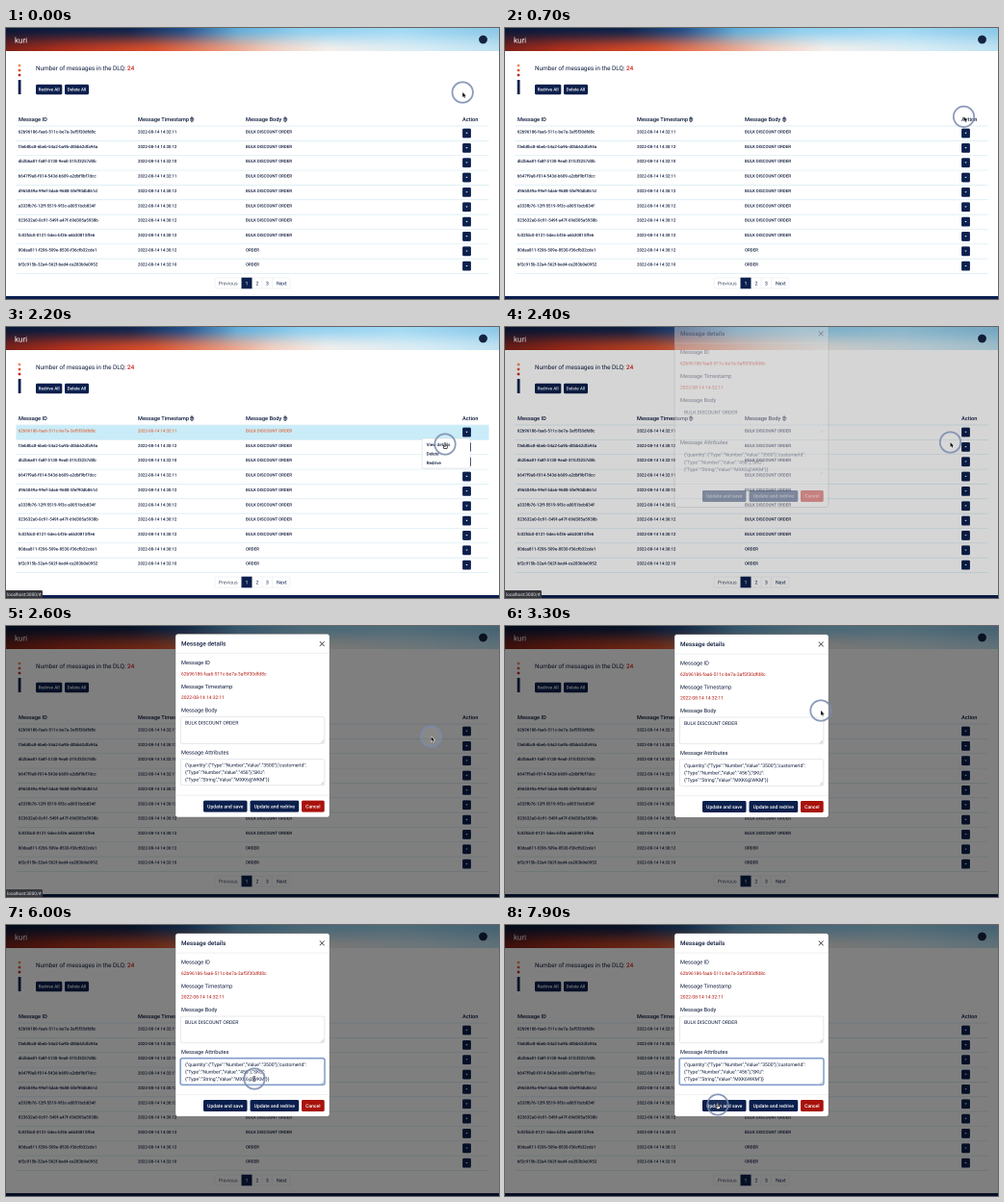
An HTML page with a canvas that plays this animation: 512 by 282 pixels, repeating every 8 s.

```html
<!DOCTYPE html>
<html lang="en">
<head>
<meta charset="utf-8">
<title>Message queue</title>
<style>
html, body { margin: 0; width: 100%; height: 100%; overflow: hidden; background: #fff; }
canvas { display: block; width: 512px; height: 282px; }
</style>
</head>
<body>
<canvas id="stage"></canvas>
<script>
const W = 512, H = 282, LOOP = 8000, STEP = 100;
const NAVY = '#0b1f4d', INK = '#0d1a3c', RED = '#b3160f', LINE = '#d6ebf4';
const LEFT = 10.5, RIGHT = 501.5, ROW_H = 15.35;
const canvas = document.getElementById('stage');
const ctx = canvas.getContext('2d');
// Oversampling keeps the small type smooth
const scale = 2 * (window.devicePixelRatio || 1);
canvas.width = W * scale;
canvas.height = H * scale;

const ROWS = [
  ['62b96186-faa6-511c-be7a-3af5f30dfd8c', '32:11'],
  ['f3eb8bc8-6beb-54a2-ba9b-d0bb62dfa94a', '30:12'],
  ['db2b6a81-fa8f-5130-9ea0-31fcf3257d0b', '32:10'],
  ['b647f9a8-f014-543d-b609-a2dbf9bf7dcc', '32:11'],
  ['d965049a-99ef-5da6-9688-5fef90db861d', '30:12'],
  ['a333fb76-12ff-5519-9f3c-a0051bcb834f', '30:12'],
  ['023632a0-0c91-549f-a47f-69d305a5938b', '30:12'],
  ['fc02fdc0-0121-5dec-bf36-a6b30815ffe6', '30:12'],
  ['80daa811-f206-509e-8530-f36cfb32cde1', '30:12'],
  ['bf2c915b-32a4-562f-bed4-ca283b0e0952', '32:10']
].map(([id, time], i) => ({
  id, time: '2022-08-14 14:' + time, body: i < 8 ? 'BULK DISCOUNT ORDER' : 'ORDER'
}));

// Pointer stops: time, x, y
const PATH = [
  [0, 474.2, 67], [300, 474.2, 67], [1000, 478, 108.7], [1600, 478, 108.7],
  [2100, 456, 122], [2300, 456, 122], [2400, 462.5, 120], [3200, 328, 88],
  [3700, 328, 88], [4600, 269.5, 138.5], [4900, 269.5, 138.5],
  [5500, 258, 160], [6900, 258, 160], [7500, 221, 187], [8000, 221, 187]
];
const MENU_AT = 1300, MODAL_AT = 2350, FOCUS_AT = 5600, DELETE_AT = 6600;

const clamp = v => Math.max(0, Math.min(1, v));
const smooth = v => v * v * (3 - 2 * v);

function pointerAt(t) {
  let i = 0;
  while (i < PATH.length - 2 && t >= PATH[i + 1][0]) i++;
  const [t0, x0, y0] = PATH[i], [t1, x1, y1] = PATH[i + 1];
  const k = smooth(clamp((t - t0) / (t1 - t0)));
  return [x0 + (x1 - x0) * k, y0 + (y1 - y0) * k];
}

function text(str, x, y, size, color = INK, weight = 400, align = 'left') {
  ctx.font = `${weight} ${size}px Roboto, "Liberation Sans", sans-serif`;
  ctx.textRendering = 'geometricPrecision';
  ctx.textAlign = align;
  ctx.fillStyle = color;
  ctx.fillText(str, x, y);
}

function box(x, y, w, h, r, fill, stroke, width = 0.5) {
  ctx.beginPath();
  ctx.roundRect(x, y, w, h, r);
  if (fill) { ctx.fillStyle = fill; ctx.fill(); }
  if (stroke) { ctx.strokeStyle = stroke; ctx.lineWidth = width; ctx.stroke(); }
}

function dot(x, y, r, fill) {
  ctx.beginPath();
  ctx.arc(x, y, r, 0, Math.PI * 2);
  ctx.fillStyle = fill;
  ctx.fill();
}

function line(points, color, width) {
  ctx.beginPath();
  points.forEach(([x, y]) => ctx.lineTo(x, y));
  ctx.strokeStyle = color;
  ctx.lineWidth = width;
  ctx.stroke();
}

function poly(points, fill) {
  ctx.beginPath();
  points.forEach(([x, y]) => ctx.lineTo(x, y));
  ctx.closePath();
  ctx.fillStyle = fill;
  ctx.fill();
}

function button(label, x, y, w, h, size, fill = NAVY) {
  box(x, y, w, h, 1.6, fill);
  text(label, x + w / 2, y + h / 2 + size * 0.36, size, '#fff', 500, 'center');
}

function sortIcon(x, y) {
  for (const s of [-1, 1]) {
    line([[x - 1.7, y + s * 0.7], [x, y + s * 2.5], [x + 1.7, y + s * 0.7], [x - 1.7, y + s * 0.7]], INK, 0.7);
  }
}

function sweep(stops) {
  const g = ctx.createLinearGradient(0, 0, W, 0);
  stops.forEach(([p, c]) => g.addColorStop(p, c));
  return g;
}

// Cool colours along the top edge melt into warm ones along the bottom
function header() {
  ctx.fillStyle = sweep([[0, '#0a1836'], [0.25, '#10244c'], [0.36, '#24508a'],
    [0.47, '#62aedb'], [0.6, '#90d0f0'], [0.8, '#a3daf4'], [1, '#8cc8e8']]);
  ctx.fillRect(0, 0, W, 24);
  ctx.fillStyle = sweep([[0, '#7c2119'], [0.12, '#b0301c'], [0.3, '#d9512c'],
    [0.42, '#e88d70'], [0.54, '#f3cfc0'], [0.65, '#f3efec'], [0.85, '#d8edf6'], [1, '#bfe2f2']]);
  for (let y = 0; y < 24; y++) {
    ctx.globalAlpha = smooth((y + 0.5) / 24);
    ctx.fillRect(0, y, W, 1);
  }
  ctx.globalAlpha = 1;
  text('kuri', 9, 15.5, 8, '#fff');
  dot(495.5, 12, 4.4, '#14233f');
}

function summary() {
  dot(14, 39, 1.4, '#f08a5d');
  dot(14, 44, 1.4, '#e2502c');
  dot(14, 49, 1.4, '#c02a16');
  ctx.fillStyle = NAVY;
  ctx.fillRect(12.7, 54, 2.8, 15);
  const label = 'Number of messages in the DLQ: ';
  text(label, 31, 44, 6.4);
  text('24', 31 + ctx.measureText(label).width, 44, 6.4, '#d3221a', 500);
  button('Redrive All', 31, 58.8, 27.3, 10.4, 4.6);
  button('Delete All', 61, 58.8, 25, 10.4, 4.6);
}

function table(hover) {
  text('Message ID', 13, 97.2, 5.65, INK, 500);
  text('Message Timestamp', 137, 97.2, 5.65, INK, 500);
  text('Message Body', 249, 97.2, 5.65, INK, 500);
  text('Action', 474, 97.2, 5.65, INK, 500);
  sortIcon(193, 95.1);
  sortIcon(290, 95.1);
  line([[LEFT, 102], [RIGHT, 102]], LINE, 0.7);
  ROWS.forEach((row, i) => {
    const y = 102 + i * ROW_H, lit = hover && i === 0;
    if (lit) {
      ctx.fillStyle = '#c9ecf8';
      ctx.fillRect(LEFT, y + 0.3, RIGHT - LEFT, ROW_H - 0.6);
    }
    const color = lit ? '#e2663a' : INK;
    text(row.id, 12.8, y + 7.5, 4.38, color, 500);
    text(row.time, 137, y + 7.5, 4.3, color, 500);
    text(row.body, 249, y + 7.5, 4.4, color, 500);
    box(474.1, y + 2.6, 8.8, 9.8, 1.3, NAVY);
    poly([[477.3, y + 6.8], [479.7, y + 6.8], [478.5, y + 8.1]], '#fff');
    line([[LEFT, y + ROW_H], [RIGHT, y + ROW_H]], LINE, 0.7);
  });
}

function pager() {
  box(217, 260, 78, 11, 1.5, '#fff', '#dee2e6', 0.4);
  ctx.fillStyle = NAVY;
  ctx.fillRect(244.5, 259.7, 11, 11.6);
  line([[266, 260], [266, 271]], '#dee2e6', 0.4);
  line([[276.5, 260], [276.5, 271]], '#dee2e6', 0.4);
  [['Previous', 230.7, '#4c566b'], ['1', 250, '#fff'], ['2', 261, NAVY], ['3', 271.3, NAVY], ['Next', 286.3, NAVY]]
    .forEach(([s, x, c]) => text(s, x, 267.3, 5.2, c, 400, 'center'));
}

function menu() {
  box(432, 116, 50, 31, 1.5, '#fff', '#c8ccd2', 0.4);
  ['View details', 'Delete', 'Redrive'].forEach((s, i) => text(s, 436.6, 124.1 + i * 9.4, 4.55, INK, 500));
}

function field(y, h, focus) {
  if (focus) box(180.8, y - 0.2, 150.4, h + 0.4, 2, null, 'rgba(120,155,215,.45)', 2);
  box(181.3, y, 149.6, h, 1.8, null, focus ? '#5f7fb5' : '#ced4da', focus ? 0.8 : 0.5);
  for (const d of [1.5, 3]) line([[330 - d, y + h - 0.8], [330, y + h - 0.8 - d]], '#888', 0.4);
}

function modal(t, fade) {
  const focus = t >= FOCUS_AT, edited = t >= DELETE_AT;
  const tone = Math.round(200 + 55 * fade);
  box(176, 8.7, 160, 190.6, 2.6, `rgb(${tone},${tone},${tone})`, '#6e6e6e', 0.4);
  text('Message details', 182, 21, 6.3, INK, 500);
  line([[325.8, 16.5], [330.6, 21.3]], '#444', 0.8);
  line([[330.6, 16.5], [325.8, 21.3]], '#444', 0.8);
  line([[176, 29], [336, 29]], '#dee2e6', 0.5);
  line([[176, 176.5], [336, 176.5]], '#dee2e6', 0.5);
  text('Message ID', 182, 40.3, 5.7);
  text(ROWS[0].id, 182, 51.8, 4.93, RED);
  text('Message Timestamp', 182, 65.3, 5.7);
  text(ROWS[0].time, 182, 76.5, 4.93, RED);
  text('Message Body', 182, 90, 5.7);
  field(95, 27.8, false);
  text(ROWS[0].body, 186, 102.8, 5.1);
  text('Message Attributes', 182, 134, 5.7);
  field(138.8, 27.4, focus);
  const code = '{"Type":"String","Value":"MXK6' + (edited ? '' : '@');
  text('{"quantity":{"Type":"Number","Value":"3500"},"customerId":', 186, 146.8, 5.04);
  text('{"Type":"Number","Value":"456"},"SKU":', 186, 154.4, 5.04);
  text(code + 'WKM"}}', 186, 162, 5.04);
  if (focus && t < 7300 && (t - FOCUS_AT) % 1000 < 500) {
    const x = 186 + ctx.measureText(code).width;
    line([[x, 157.5], [x, 163]], INK, 0.4);
  }
  button('Update and save', 205, 182, 45.5, 12, 5);
  button('Update and redrive', 253.5, 182, 50.7, 12, 5);
  button('Cancel', 307, 182, 23.7, 12, 5, '#a8120c');
}

function pointer(t) {
  const [x, y] = pointerAt(t);
  ctx.beginPath();
  ctx.arc(x, y, 10.7, 0, Math.PI * 2);
  ctx.fillStyle = 'rgba(255,255,255,.07)';
  ctx.fill();
  ctx.strokeStyle = 'rgba(122,138,174,.85)';
  ctx.lineWidth = 1.8;
  ctx.stroke();
  const hand = (t >= 1000 && t < MODAL_AT) || t >= 7400;
  const beam = t >= 4300 && t < 7200;
  ctx.save();
  ctx.translate(x, y);
  if (beam) {
    line([[0, -2.6], [0, 2.6]], '#222', 0.6);
    line([[-1.1, -2.8], [1.1, -2.8]], '#222', 0.5);
    line([[-1.1, 2.8], [1.1, 2.8]], '#222', 0.5);
  } else if (hand) {
    box(-1.7, 1, 4, 3.6, 1.3, '#fff', '#111', 0.7);
    box(-0.8, -1.8, 1.3, 4.4, 0.6, '#fff', '#111', 0.5);
  } else {
    const arrow = [[0, 0], [0, 5], [1.2, 3.9], [2, 5.7], [2.8, 5.3], [2, 3.6], [3.6, 3.6]];
    line([...arrow, arrow[0]], '#fff', 0.9);
    poly(arrow, '#111');
  }
  ctx.restore();
}

function draw(t) {
  ctx.setTransform(scale, 0, 0, scale, 0, 0);
  ctx.fillStyle = '#fff';
  ctx.fillRect(0, 0, W, H);
  header();
  summary();
  table(pointerAt(t)[1] > 102 && t < MODAL_AT);
  pager();
  ctx.fillStyle = NAVY;
  ctx.fillRect(0, 279, W, 3);
  if (t >= MENU_AT && t < MODAL_AT) menu();
  const fade = clamp((t - MODAL_AT) / 150);
  if (fade > 0) {
    ctx.fillStyle = `rgba(0,0,0,${fade * 0.5})`;
    ctx.fillRect(0, 0, W, H);
    const left = 1 - clamp((t - MODAL_AT) / 300);
    ctx.save();
    ctx.globalAlpha = Math.pow(fade, 0.75);
    ctx.translate(0, -18 * Math.pow(left, 2.2));
    modal(t, fade);
    ctx.restore();
  }
  if (t >= 2000 && t < 2900) {
    box(-2, 274, 40, 10, 1.5, '#34363b');
    text('localhost:3000/#', 1, 280, 4.7, '#e4e6ea');
  }
  pointer(t);
}

const start = performance.now();
function frame() {
  const t = (performance.now() - start) % LOOP;
  draw(Math.floor(t / STEP) * STEP);
  requestAnimationFrame(frame);
}
frame();
</script>
</body>
</html>
```
